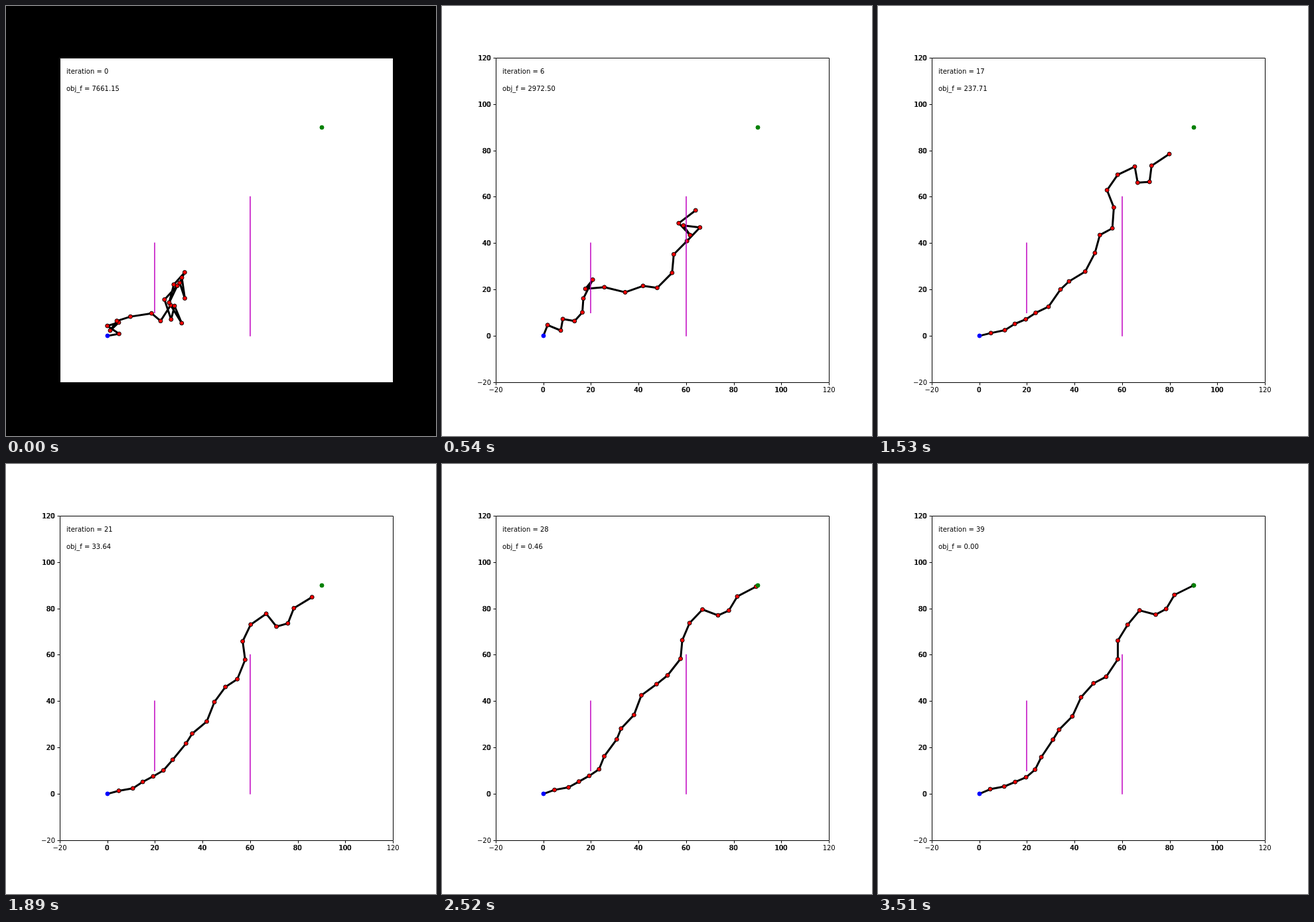
Recreate the animation shown at these times as an HTML page with a canvas. Size 648 by 648 pixels, loop 3600 ms.

```html
<!DOCTYPE html>
<html lang="en">
<head>
<meta charset="utf-8">
<title>Arm optimisation</title>
<style>
  html, body { margin: 0; width: 100%; height: 100%; overflow: hidden; background: #fff; }
  canvas { display: block; }
</style>
</head>
<body>
<canvas id="stage" width="648" height="648"></canvas>
<script>
const ctx = document.getElementById("stage").getContext("2d");

const STEP_MS = 90, STEPS = 40;
const LEFT = 81, RIGHT = 583, TOP = 78, BOTTOM = 567;
const MIN = -20, MAX = 120;
const toX = x => 152.74 + x * 3.587;
const toY = y => 497.11 - y * 3.4946;

const LINKS = [5, 6, 5, 5, 5, 6, 9, 5, 8, 9, 8, 6, 9, 8, 8, 8, 7, 5, 7, 9];
const WALLS = [{ x: 20, from: 10, to: 40 }, { x: 60, from: 0, to: 60 }];

// Heading of every link in degrees, at a few iterations.
const POSES = [
  { at: 0, score: 7661.15, angles: [10, 145, 17, 224, 56, 18, 9, -41, 58, -59, 112, 256, 108, 48, 245, 76, 49, 245, -72, 98] },
  { at: 6, score: 2972.50, angles: [69, -23, 80, -10, 49, 86, 64, 232, 5, -14, 20, -8, 46, 85, 46, 47, 173, -56, 133, 38] },
  { at: 11, score: 1214.13, angles: [59, -5, 28, 22, 7, 76, 95, 35, 3, 38, 32, -54, 42, 77, 59, 106, 45, 99, 49, 27] },
  { at: 17, score: 237.71, angles: [14, 12, 33, 23, 34, 26, 56, 44, 32, 63, 75, 29, 86, 111, 56, 26, -80, 4, 83, 34] },
  { at: 25, score: 4.76, angles: [17, 8, 35, 34, 28, 73, 47, 73, 49, 75, 34, 39, 51, 84, 74, 45, -24, 28, 55, 30] },
  { at: 32, score: 0.02, angles: [24, 14, 23, 24, 43, 63, 64, 63, 45, 63, 41, 40, 55, 86, 59, 50, -17, 20, 66, 26] },
  { at: 39, score: 0.004, angles: [24, 11, 23, 24, 41, 64, 57, 59, 46, 66, 49, 28, 57, 90, 59, 51, -15, 29, 60, 27] }
];

// Shortest signed turn from a to b.
const turn = (a, b) => ((b - a + 540) % 360 + 360) % 360 - 180;

function poseAt(iteration) {
  let i = 0;
  while (i < POSES.length - 2 && POSES[i + 1].at <= iteration) i++;
  const a = POSES[i], b = POSES[i + 1];
  const k = (iteration - a.at) / (b.at - a.at);
  return {
    score: a.score * Math.pow(b.score / a.score, k),
    angles: a.angles.map((angle, j) => angle + k * turn(angle, b.angles[j]))
  };
}

function jointsOf(angles) {
  let x = 0, y = 0;
  return angles.map((angle, i) => {
    const rad = angle * Math.PI / 180;
    x += LINKS[i] * Math.cos(rad);
    y += LINKS[i] * Math.sin(rad);
    return [toX(x), toY(y)];
  });
}

function dot(x, y, fill, edge) {
  ctx.beginPath();
  ctx.arc(x, y, 3, 0, 2 * Math.PI);
  ctx.fillStyle = fill;
  ctx.fill();
  ctx.lineWidth = 1;
  ctx.strokeStyle = edge;
  ctx.stroke();
}

function label(text, x, y, align, doubled) {
  ctx.textAlign = align;
  ctx.fillText(text, x, y);
  if (doubled) ctx.fillText(text, x - 0.8, y);
}

function drawAxes() {
  ctx.fillStyle = "#fff";
  ctx.fillRect(LEFT, TOP, RIGHT - LEFT, BOTTOM - TOP);
  ctx.strokeStyle = ctx.fillStyle = "#000";
  ctx.lineWidth = 1;
  ctx.strokeRect(LEFT + 0.5, TOP + 0.5, RIGHT - LEFT, BOTTOM - TOP);
  for (let v = MIN; v <= MAX; v += 20) {
    const x = Math.round(toX(v)), y = Math.round(toY(v));
    const text = String(v).replace("-", "\u2212");
    ctx.fillRect(x, BOTTOM + 1, 1, 3.5);
    ctx.fillRect(LEFT - 3.5, y, 3.5, 1);
    label(text, toX(v), 582, "center", v > MIN && v < MAX);
    label(text, 74, toY(v) + 4, "right", v > MIN);
  }
}

function drawArm(joints) {
  ctx.beginPath();
  ctx.moveTo(toX(0), toY(0));
  joints.forEach(([x, y]) => ctx.lineTo(x, y));
  ctx.lineWidth = 3;
  ctx.lineJoin = "round";
  ctx.strokeStyle = "#000";
  ctx.stroke();
  joints.forEach(([x, y]) => dot(x, y, "#f00", "#000"));
  dot(153, 497, "#00f", "#00f");
}

function drawWalls() {
  ctx.lineWidth = 1.5;
  ctx.strokeStyle = "#bf00bf";
  for (const wall of WALLS) {
    const x = Math.round(toX(wall.x) - 0.1);
    ctx.beginPath();
    ctx.moveTo(x, toY(wall.from) + 0.75);
    ctx.lineTo(x, toY(wall.to) - 0.75);
    ctx.stroke();
  }
}

function draw(iteration) {
  const pose = poseAt(iteration);
  ctx.font = '10px "DejaVu Sans", sans-serif';
  // The very first step stands on a black surround.
  ctx.fillStyle = iteration === 0 ? "#000" : "#fff";
  ctx.fillRect(0, 0, 648, 648);
  drawAxes();
  drawArm(jointsOf(pose.angles));
  drawWalls();
  dot(476, 183, "#008000", "#008000");
  ctx.fillStyle = "#000";
  label("iteration = " + iteration, 91, 102, "left");
  label("obj_f = " + pose.score.toFixed(2), 91, 128, "left");
}

const start = performance.now();
function tick() {
  draw(Math.floor((performance.now() - start) / STEP_MS) % STEPS);
  requestAnimationFrame(tick);
}
tick();
</script>
</body>
</html>
```
